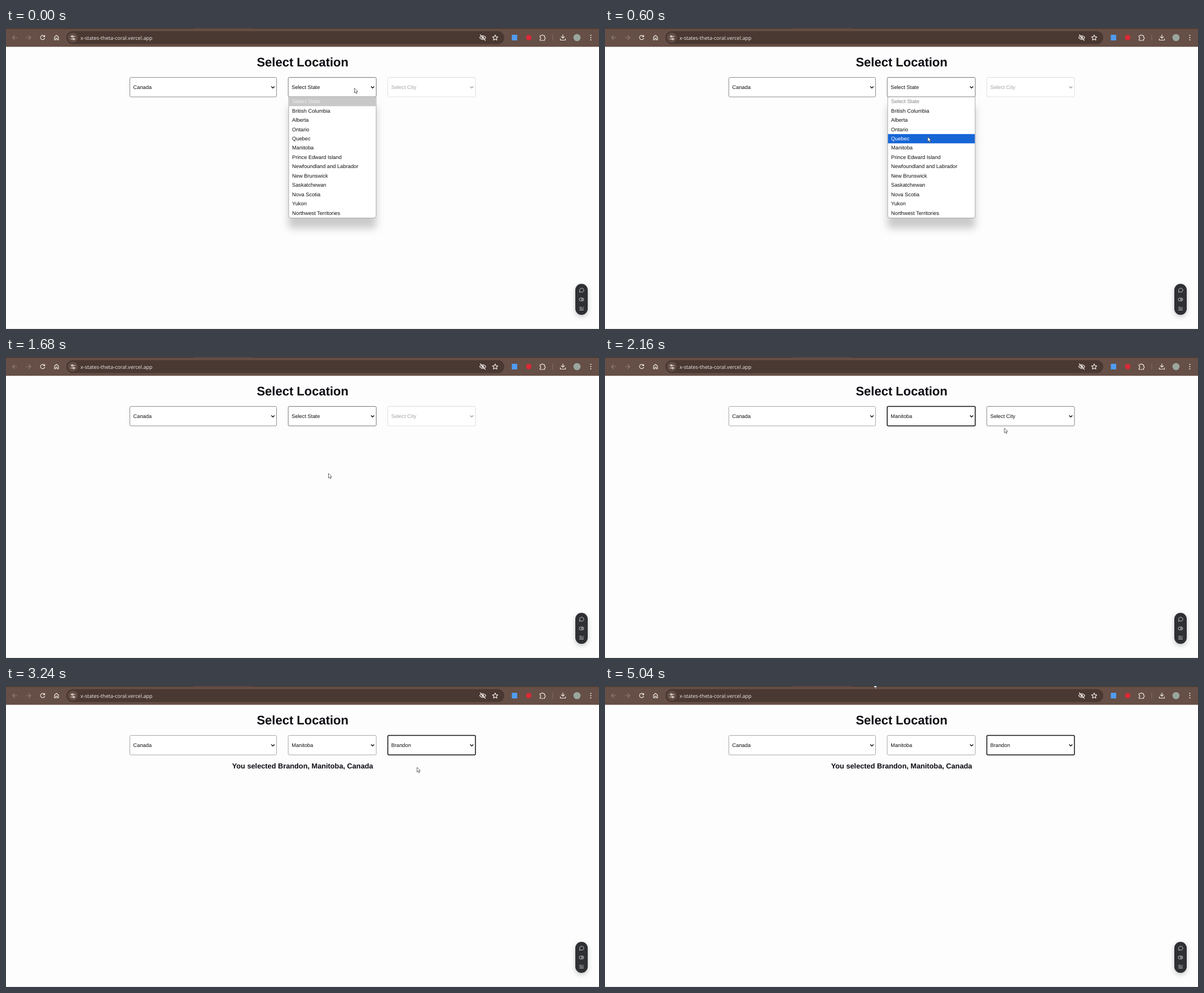
An HTML page that plays this animation: 1051 by 533 pixels, repeating every 5160 ms.

```html
<!DOCTYPE html>
<html lang="en">
<head>
<meta charset="utf-8">
<title>Select Location</title>
<style>
html, body { margin: 0; height: 100%; overflow: hidden; background: #fdfdfd; }
svg { display: block; width: 100vw; height: 100vh; font: 9.3px "Liberation Sans", Arial, sans-serif; text-rendering: geometricPrecision; }
.bold { font-weight: bold; text-anchor: middle; fill: #0b0b12; }
.url { font: 9.1px "Open Sans", sans-serif; fill: #f1ebe8; }
.icon { fill: none; stroke: #eee6e2; stroke-width: 1.2; stroke-linecap: round; stroke-linejoin: round; }
.dim { stroke: #927e75; }
.panel { filter: drop-shadow(0 18px 7px rgba(0, 0, 0, .2)); }
.dock { filter: drop-shadow(0 3px 4px rgba(0, 0, 0, .22)); }
</style>
</head>
<body>
<svg viewBox="0 0 1051 533">
  <rect width="1051" height="533" fill="#fdfdfd"/>
  <path d="M0 532.5H1051" stroke="#e4e4e4"/>

  <rect width="1051" height="33.3" fill="#654f46"/>
  <rect width="1051" height="1.4" fill="#46362f"/>
  <rect x="333" width="104" height="1.4" fill="#5a463e"/>
  <rect x="107" y="5.5" width="776" height="23" rx="11.5" fill="#4a3832"/>
  <circle cx="118.5" cy="17" r="8.7" fill="#624d44"/>
  <text class="url" x="132" y="20.5">x-states-theta-coral.vercel.app</text>

  <g class="icon">
    <path class="dim" d="M19.5 17H11.5m3.6-3.6L11.5 17l3.6 3.6M36 17h8m-3.6-3.6L44 17l-3.6 3.6"/>
    <path d="M68.3 15A3.8 3.8 0 1 0 68.6 18M68.6 13v2.4h-2.5"/>
    <path d="M86 16l3.5-3 3.5 3v5h-2.3v-3h-2.4v3H86z"/>
    <path d="M115 15h1m3 0h3.500M115 19.500h3.500m3 0h1"/>
    <circle cx="117.5" cy="15" r="1.3"/><circle cx="120" cy="19.500" r="1.3"/>
    <path d="M839.500 17q5.500-7 11 0q-5.500 7-11 0M840.500 12l9 10"/><circle cx="845" cy="17" r="1.6"/>
    <path d="M867 12.300l1.400 3.100 3.400.4-2.500 2.300.7 3.300-3-1.700-3 1.700.7-3.300-2.500-2.300 3.400-.4z"/>
    <path d="M946.500 13.500h2.700a1.500 1.500 0 0 1 3 0h2.300v3a1.500 1.500 0 0 1 0 3v2.500h-8v-2.500a1.500 1.500 0 0 0 0-3z"/>
    <path d="M987 12v6m-2.700-2.500L987 18.200l2.700-2.700M982.500 19v2.500h9V19"/>
    <path d="M969 12v10" stroke="#806b61"/>
  </g>
  <rect x="896.500" y="12" width="9.500" height="10" fill="#4f9cf3"/>
  <circle cx="926.500" cy="17" r="4.800" fill="#dc2937"/>
  <circle cx="1012" cy="17" r="6.300" fill="#9aa79f"/>
  <g fill="#eee6e2"><circle cx="1036.500" cy="13" r="1.100"/><circle cx="1036.500" cy="17" r="1.100"/><circle cx="1036.500" cy="21" r="1.100"/></g>

  <text class="bold" x="525.700" y="68" font-size="22">Select Location</text>
  <g id="form"></g>

  <rect class="dock" x="1009" y="453" width="22" height="55" rx="11" fill="#2e3034"/>
  <g fill="none" stroke="#d2d3d5" stroke-width=".9">
    <path d="M1016.500 468l.6-2.200a3.700 3.500 0 1 1 1.700 1.600z"/>
    <rect x="1016" y="478" width="8" height="5.400" rx="2.700"/><circle cx="1021" cy="480.700" r="1.300"/>
    <path d="M1016.300 494.500h4.500m1.800 0h1.500M1016.300 497h7.500M1016.300 499.500h7.500"/>
  </g>
  <path id="cursor" d="M0 0V8.300l1.900-1.700 1.300 3 1.500-.6-1.300-2.900h2.600z" fill="#fff" stroke="#444" stroke-width=".8" stroke-linejoin="round"/>
</svg>
<script>
const LOOP = 5160, STEP = 120, ROW = 16.45, TOP = 122;
const STATES = ['Select State', 'British Columbia', 'Alberta', 'Ontario', 'Quebec', 'Manitoba',
  'Prince Edward Island', 'Newfoundland and Labrador', 'New Brunswick', 'Saskatchewan',
  'Nova Scotia', 'Yukon', 'Northwest Territories'];
const CITIES = ['Select City', 'Brandon', 'Winnipeg'];
// time, x, y of the pointer tip
const PATH = [[0, 617.5, 106.5], [360, 575, 177.5], [840, 569, 208], [1440, 569, 208],
  [1680, 571.5, 206], [1800, 571.5, 206], [2280, 733, 111], [2640, 733, 111],
  [3000, 728.5, 144], [3720, 728.5, 144], [5040, 477, -4.5]];
const form = document.getElementById('form'), cursor = document.getElementById('cursor');

function pointer(t) {
  const i = PATH.findIndex(p => p[0] > t);
  if (i < 0) return PATH[PATH.length - 1].slice(1);
  const [t0, x0, y0] = PATH[i - 1], [t1, x1, y1] = PATH[i];
  const u = (t - t0) / (t1 - t0), k = u * u * (3 - 2 * u);
  return [x0 + (x1 - x0) * k, y0 + (y1 - y0) * k];
}

function select(x, w, label, border, ink = '#111', weight = 1) {
  return `<rect x="${x}" y="87.5" width="${w}" height="34.5" rx="2" fill="#fff" stroke="${border}" stroke-width="${weight}"/>
    <text x="${x + 6}" y="108" fill="${ink}">${label}</text>
    <path d="M${x + w - 9.3} 103.5l2.800 2.800 2.800-2.800" fill="none" stroke="${ink}" stroke-width="1.5"/>`;
}

function list(x, w, items, y, shadow) {
  const active = Math.max(0, Math.floor((y - TOP) / ROW)), h = items.length * ROW + .6;
  const rows = items.map((item, i) => {
    const on = i === active, ink = on ? (i ? '#fff' : '#eee') : (i ? '#111' : '#858585');
    const bar = on ? `<rect x="${x + .5}" y="${TOP + i * ROW}" width="${w - 1}" height="${ROW}" fill="${i ? '#1766d6' : '#c8c8c8'}"/>` : '';
    return `${bar}<text x="${x + 6}" y="${TOP + 11.2 + i * ROW}" fill="${ink}">${item}</text>`;
  });
  return `<path class="${shadow ? 'panel' : ''}" d="M${x} ${TOP}h${w}v${h - 4}q0 4-4 4h${8 - w}q-4 0-4-4z" fill="#fff" stroke="#999" stroke-width=".8"/>` + rows.join('');
}

function draw(t) {
  const [x, y] = pointer(t);
  const picked = t >= 1800, cityOpen = t >= 2400 && t < 3120, done = t >= 3240;
  const stateFocus = picked && t < 2400;
  form.innerHTML =
    select(219.5, 260, 'Canada', picked ? '#a8a8a8' : '#8c8c8c') +
    select(500.2, 156, picked ? 'Manitoba' : 'Select State',
      stateFocus ? '#111' : picked ? '#a8a8a8' : '#777', '#111', stateFocus ? 1.5 : 1) +
    select(676.7, 155.3, done ? 'Brandon' : 'Select City',
      done ? '#111' : picked ? '#858585' : '#dedede', picked ? '#111' : '#a5a5a5', done ? 1.5 : 1) +
    (t < 1680 ? list(501, 155, STATES, y, true) : '') +
    (cityOpen ? list(677, 155, CITIES, y, t >= 2640) : '') +
    (done ? '<text class="bold" x="525.7" y="146.3" font-size="12.75">You selected Brandon, Manitoba, Canada</text>' : '');
  cursor.setAttribute('transform', `translate(${x} ${y})`);
}

let last = -1;
const start = performance.now();
function tick(now) {
  const t = Math.floor(Math.max(0, now - start) % LOOP / STEP) * STEP;
  if (t !== last) draw(last = t);
  requestAnimationFrame(tick);
}
tick(start);
</script>
</body>
</html>
```
